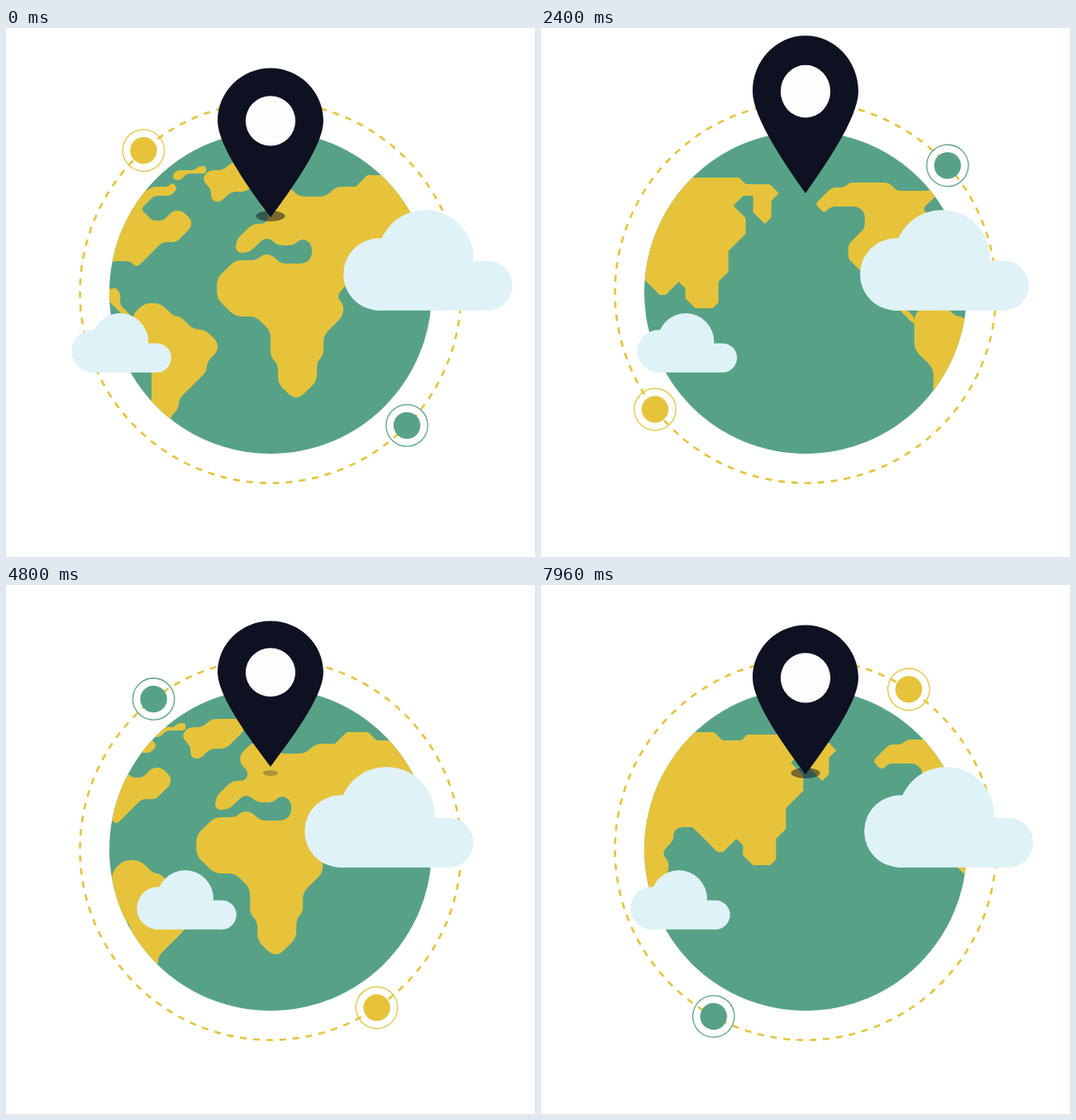
These frames come from a looping animation (640x640 px, 8 s). An HTML page:

```html
<!DOCTYPE html>
<html lang="en">
<head>
<meta charset="utf-8">
<title>Spinning globe</title>
<style>
  html, body { margin: 0; width: 100%; height: 100%; overflow: hidden; background: #fff; }
  svg { display: block; width: 100%; height: 100%; }
</style>
</head>
<body>
<svg viewBox="0 0 640 640">
  <defs>
    <clipPath id="disc"><circle cx="320" cy="320" r="195"/></clipPath>
    <g id="cloud" fill="#dff2f8">
      <circle cx="43.7" cy="-43.7" r="43.7"/>
      <circle cx="99.2" cy="-63.5" r="58"/>
      <rect x="13.7" y="-60" width="190.6" height="60" rx="30"/>
    </g>
    <g id="marker">
      <circle r="16.2" fill="currentColor"/>
      <circle r="25.2" fill="none" stroke="currentColor" stroke-width="1.3"/>
    </g>
    <path id="land"/>
  </defs>

  <circle cx="320" cy="320" r="195" fill="#57a287"/>
  <g clip-path="url(#disc)">
    <g id="map" fill="#e6c33a">
      <use href="#land"/>
      <use href="#land" x="-622"/>
    </g>
  </g>
  <g id="orbit">
    <circle r="230.5" fill="none" stroke="#e6c33a" stroke-width="2.6"
            pathLength="182" stroke-dasharray="1 1" stroke-dashoffset="-.78"/>
    <use href="#marker" x="230.5" color="#e6c33a"/>
    <use href="#marker" x="230.5" color="#57a287" transform="rotate(176.05)"/>
  </g>
  <use id="bigCloud" href="#cloud"/>
  <use id="smallCloud" href="#cloud"/>
  <ellipse id="shadow" rx="17.5" ry="6.5" fill="#0e1122"/>
  <g id="pin">
    <path fill="#0e1122" d="M0-180.7C35.3-180.7 64-152 64-117C64-86 22-30 0 0C-22-30-64-86-64-117C-64-152-35.3-180.7 0-180.7Z"/>
    <circle cy="-116.9" r="30.1" fill="#fdfdfd"/>
  </g>
</svg>
<script>
const LOOP = 8000, MAP_WIDTH = 622;
const el = id => document.getElementById(id);
const place = (id, transform) => el(id).setAttribute('transform', transform);

// Key points of each coast; outline() fills in the straight and diagonal runs.
const africaAndEurope = outline(8, `323,190 354,204 399,192 430,192 430,293 414,299 402,321 408,334
  384,372 376,404 356,447 329,430 320,398 302,349 255,327 277,281 310,274 332,285 370,277 363,256
  348,263 320,255 294,272 278,272 298,237 317,232 308,216`);
const asia = outline(1, `423,192 437,178 473,188 503,181 571,189 611,200 602,209 594,237 580,223
  580,203 556,215 571,230 550,270 538,307 531,339 498,327 490,307 474,323 437,293 420,293`);
const northAmerica = outline(5, `33,213 53,193 74,187 132,197 176,192 201,187 206,192 199,203 163,219
  177,233 202,221 224,232 206,259 160,288 150,282 118,293 127,317 131,313 138,320 153,350 153,357
  73,279 93,242 85,216 44,224`);
const southAmerica = outline(8, `167,333 203,349 227,365 256,380 243,404 209,449 198,471 206,496
  200,502 176,478 153,389`);
const greenland = outline(7, '246,172 273,162 313,166 291,198 260,210 248,206 239,186');
const arcticIsle = outline(4, '207,172 233,167 242,167 242,176 211,184 205,184 202,181');

el('land').setAttribute('d', africaAndEurope + asia + northAmerica + southAmerica + greenland + arcticIsle);

// Joins key points by an axis-aligned run and then a 45° diagonal, trimming corners by `cut`.
function outline(cut, text) {
  const keys = text.split(/\s+/).map(p => p.split(',').map(Number));
  const corners = keys.flatMap(([x, y], i) => {
    const [nextX, nextY] = keys[(i + 1) % keys.length];
    const dx = nextX - x, dy = nextY - y;
    const run = Math.abs(dx) - Math.abs(dy);
    const elbow = run > 0 ? [x + Math.sign(dx) * run, y] : [x, y - Math.sign(dy) * run];
    const isCorner = run && dx && dy;
    return isCorner ? [[x, y], elbow] : [[x, y]];
  });
  const toward = ([x, y], [x2, y2]) => {
    const length = Math.hypot(x2 - x, y2 - y);
    const k = Math.min(cut, length / 2) / length;
    return [x + (x2 - x) * k, y + (y2 - y) * k];
  };
  return corners.map((p, i) => {
    const start = toward(p, corners.at(i - 1));
    const end = toward(p, corners[(i + 1) % corners.length]);
    return `${i ? 'L' : 'M'}${start}Q${p} ${end}`;
  }).join('') + 'Z';
}

const smooth = k => k * k * (3 - 2 * k);

// Rises from 0 to 1 and back between two times.
const bump = (t, from, to) =>
  t > from && t < to ? Math.sin(Math.PI * (t - from) / (to - from)) ** 2 : 0;

function draw(t) {
  place('map', `translate(${t / 5000 * MAP_WIDTH % MAP_WIDTH} 0)`);
  place('orbit', `translate(320 320) rotate(${-131.75 - t * 360 / 10040})`);

  const drift = smooth(1 - Math.abs(1 - t / 5000));
  place('bigCloud', `translate(${408.2 - 47.2 * drift} 341.7)`);
  place('smallCloud', `translate(${79.4 + 79.2 * drift} 416.8) scale(.59)`);

  // Crouch, leap, rebound and settle.
  const beat = t % 2000;
  const lift = 38 * bump(beat, 265, 665) + 9.5 * bump(beat, 680, 920);
  const stretch = 1 - .052 * bump(beat, 0, 240) + .06 * bump(beat, 200, 680) - .026 * bump(beat, 520, 1200);
  place('pin', `translate(320 ${229.3 - lift}) scale(1 ${stretch})`);

  const size = Math.max(0, 1 - lift / 20);
  place('shadow', `translate(320 227.5) scale(${size})`);
  el('shadow').setAttribute('opacity', .5 * size);
}

const began = performance.now();
function frame() {
  draw((performance.now() - began) % LOOP);
  requestAnimationFrame(frame);
}
frame();
</script>
</body>
</html>
```
